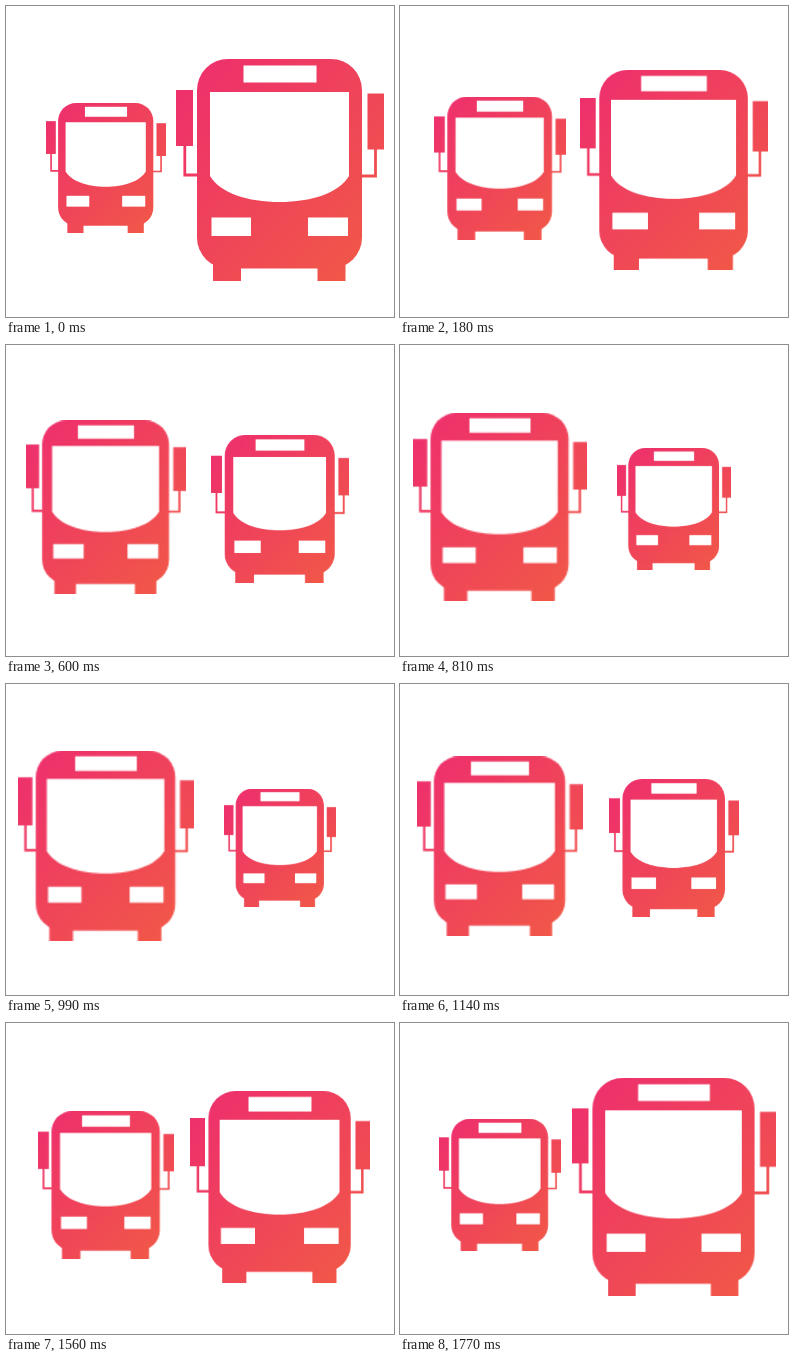
Write an HTML page with a canvas that moves like this. It is 388 by 311 pixels and loops after 1800 ms.

```html
<!DOCTYPE html>
<html lang="en">
<head>
<meta charset="utf-8">
<title>Two buses</title>
<style>
  html, body { margin: 0; width: 100%; height: 100%; overflow: hidden; background: #fff; }
  canvas { display: block; }
</style>
</head>
<body>
<canvas id="stage" width="388" height="311"></canvas>
<script>
const ctx = document.getElementById('stage').getContext('2d');
const STEP = 30, LOOP = 1800, SHRINK_END = 900, GROW_START = 930;

// A bus drawn once at its natural size, so enlarging it softens the edges.
function makeBus(w, h) {
  const canvas = document.createElement('canvas');
  canvas.width = w;
  canvas.height = h;
  const c = canvas.getContext('2d');
  c.scale(w / 208, h / 222);

  const paint = c.createLinearGradient(12, 28, 198, 212);
  paint.addColorStop(0, '#ee316b');
  paint.addColorStop(1, '#f15946');
  c.fillStyle = c.strokeStyle = paint;

  // body, wheels, mirrors
  c.beginPath();
  c.roundRect(21, 0, 165, 209.5, 31);
  c.fill();
  c.fillRect(37, 195, 28, 27);
  c.fillRect(141.5, 195, 28, 27);
  c.fillRect(0, 31, 17, 56);
  c.fillRect(191.5, 34.5, 16.5, 56);

  // mirror arms
  c.lineWidth = 2.8;
  c.beginPath();
  c.moveTo(8.8, 86);
  c.lineTo(8.8, 116);
  c.lineTo(22, 116);
  c.moveTo(199.5, 90);
  c.lineTo(199.5, 117);
  c.lineTo(185, 117);
  c.stroke();

  // sign, windscreen, headlights
  c.fillStyle = '#fff';
  c.fillRect(67.5, 6.5, 73, 17);
  c.fillRect(35.5, 158.5, 39.5, 18.5);
  c.fillRect(132, 158.5, 40, 18.5);
  c.beginPath();
  c.moveTo(34, 33);
  c.lineTo(173, 33);
  c.lineTo(173, 117);
  c.bezierCurveTo(163, 134, 135, 143, 103.5, 143);
  c.bezierCurveTo(72, 143, 44, 134, 34, 117);
  c.fill();
  return canvas;
}

const small = makeBus(120, 130), large = makeBus(208, 222);

function place(bus, x, y, scale) {
  const w = bus.width * scale, h = bus.height * scale;
  ctx.drawImage(bus, x - w / 2, y - h / 2, w, h);
}

function frame(now) {
  const t = Math.floor(now % LOOP / STEP) * STEP;
  const p = Math.min(1, t / SHRINK_END, (LOOP - t) / (LOOP - GROW_START));
  ctx.fillStyle = '#fff';
  ctx.fillRect(0, 0, 388, 311);
  ctx.imageSmoothingQuality = 'high';
  place(small, 100, 162, 1 + p / 2);
  place(large, 274, 164, 1 - p / 2);
}

const start = performance.now();
function tick() {
  frame(performance.now() - start);
  requestAnimationFrame(tick);
}
tick();
</script>
</body>
</html>
```
